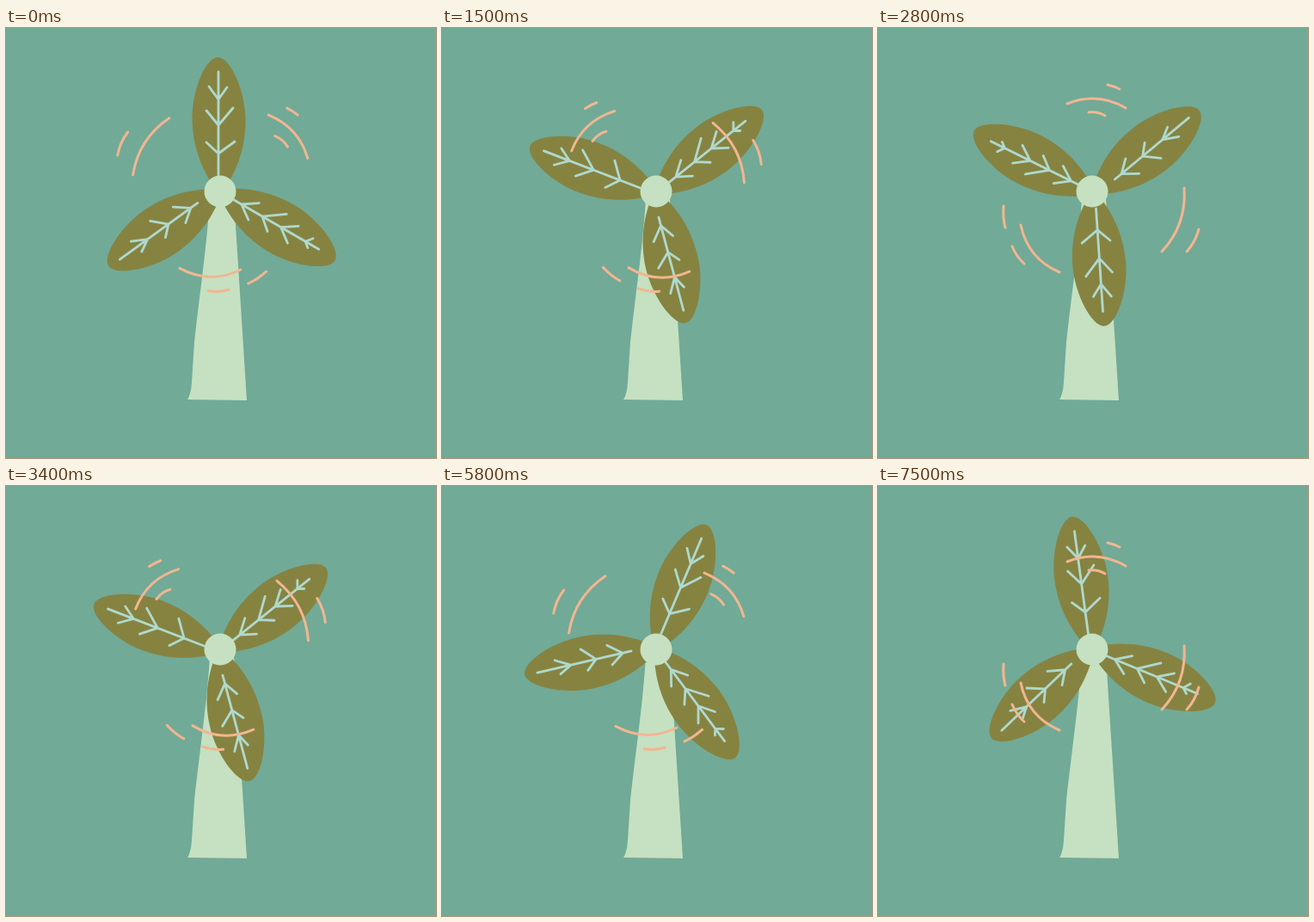
An HTML page for the animation above (7600 ms loop, 500 px wide and 500 px high).

```html
<!DOCTYPE html>
<html lang="en">
<head>
<meta charset="utf-8">
<title>Leaf windmill</title>
<style>
  html, body { margin: 0; width: 100%; height: 100%; overflow: hidden; background: #71aa97; }
  svg { display: block; width: 100vw; height: 100vh; }
  .pale { fill: #c5e1c1; }
  .leaf { fill: #868341; }
  .vein, .gust { fill: none; stroke-linecap: round; stroke-linejoin: round; }
  .vein { stroke: #afd9cd; stroke-width: 2.8; }
  .gust { stroke: #f2b690; stroke-width: 3; }
</style>
</head>
<body>
<svg viewBox="0 0 500 500">
  <defs>
    <path id="leaf" class="leaf" d="M0-156C14-156 31-118 31-84C31-48 18-22 6-4H-6C-18-22-31-48-31-84C-31-118-14-156 0-156Z"/>
  </defs>
  <path class="pale" d="M237 198C234 250 225 310 219 365L216 412Q215 426 211 432L280 433L265 198Z"/>
  <g transform="translate(249 190)">
    <g transform="translate(.6 .6)">
      <g id="rotor">
        <g transform="translate(-.6 -.6)">
          <g>
            <use href="#leaf" transform="rotate(-1)"/>
            <path class="vein" d="M-2-19V-139M-16-57L-2-44L17-58M-16-94L-2-77L15-97M-13-122L-2-107L8-121"/>
          </g>
          <g transform="rotate(120.2)">
            <use href="#leaf" transform="rotate(.9)"/>
            <path class="vein" d="M.5-18V-133M-11-46L.5-29L12-45M-16-80L.5-57L12.5-71M-11-99L.5-82L12.5-98M-7-121L.5-115L5.5-121"/>
          </g>
          <g transform="rotate(234)">
            <use href="#leaf" transform="rotate(2.2)"/>
            <path class="vein" d="M4.5-29V-141M-6-54L4.5-39L17.5-55M-6-83L4.5-71L20-86M-3-115L4.5-101L14-118"/>
          </g>
        </g>
      </g>
    </g>
    <circle class="pale" r="18.5"/>
    <path id="gust" class="gust" d="M-29-102Q6-116 39-97M18-124Q26-122 32-119M-4-92Q7-93 15-88
      M107-4Q110 39 81 70M124 44Q120 59 110 70
      M-83 39Q-75 78-38 94M-93 64Q-88 76-79 84M-103 17Q-104 31-101 42"/>
  </g>
</svg>
<script>
  const STEP = 100;        // ms per picture
  const STEPS = 38;        // pictures in two turns of the rotor
  const TURN = 360 / 47;   // degrees per drawing
  const HOLD = 6;          // drawings per gust pose

  const gustPoses = [
    'translate(3.6 1.6) rotate(52) scale(-1 1)',
    'translate(-5 1.5) rotate(-61)',
    'translate(-4 1.3) rotate(-47)',
    ''
  ];
  const rotor = document.getElementById('rotor');
  const gust = document.getElementById('gust');
  const start = performance.now();

  function draw(now) {
    const step = Math.floor(Math.max(0, now - start) / STEP) % STEPS;
    const n = Math.round(step * 2.5);
    const pose = Math.floor((n + 1) / HOLD) % gustPoses.length;
    rotor.setAttribute('transform', `rotate(${n * TURN})`);
    gust.setAttribute('transform', gustPoses[pose]);
    requestAnimationFrame(draw);
  }
  draw(start);
</script>
</body>
</html>
```
